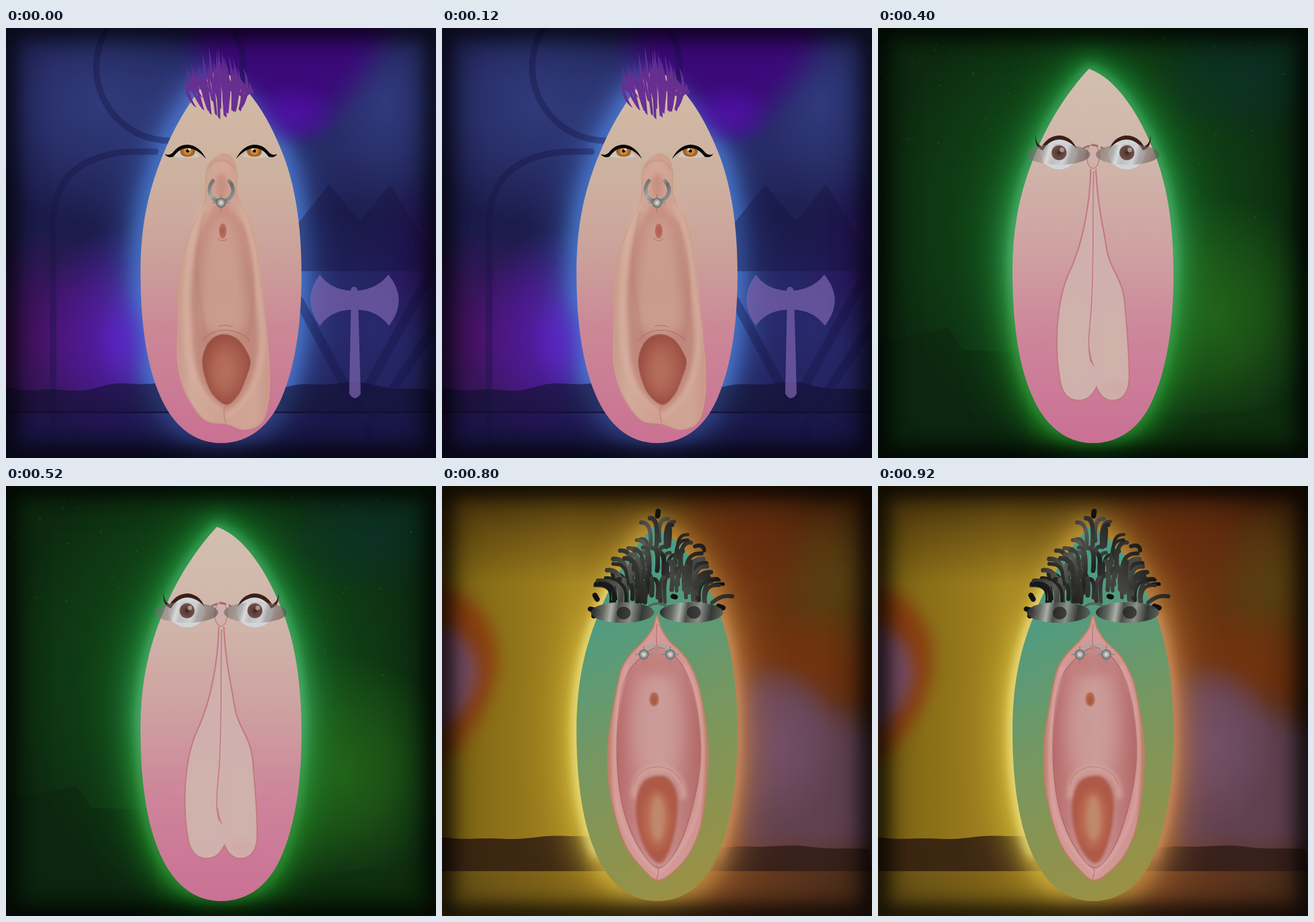
An HTML page for the animation above (1000 ms loop, 748 by 748 pixels).

```html
<!DOCTYPE html>
<html lang="en">
<head>
<meta charset="utf-8">
<title>Portrait loop</title>
<style>
html, body { margin: 0; width: 100%; height: 100%; overflow: hidden; background: #000; }
svg { display: block; width: 100vw; height: 100vh; }
</style>
</head>
<body>
<svg id="stage" viewBox="0 0 748 748" xmlns="http://www.w3.org/2000/svg"></svg>
<script>
const STEP = 200;
let defs = '', ids = 0, seed = 7;

const rnd = () => (seed = (seed * 16807) % 2147483647) / 2147483647;
const span = (a, b) => a + (b - a) * rnd();
const mix = (a, b, t) => a + (b - a) * t;
const r1 = v => Math.round(v * 10) / 10;

// Gradients: stops are "offset color [opacity]"
function grad(type, attrs, stops) {
  const id = 'g' + ids++;
  const body = stops.map(s => {
    const [o, c, a = 1] = s.split(' ');
    return `<stop offset="${o}" stop-color="${c}" stop-opacity="${a}"/>`;
  }).join('');
  defs += `<${type}Gradient id="${id}" ${attrs}>${body}</${type}Gradient>`;
  return `url(#${id})`;
}
const line = (x1, y1, x2, y2, ...stops) =>
  grad('linear', `gradientUnits="userSpaceOnUse" x1="${x1}" y1="${y1}" x2="${x2}" y2="${y2}"`, stops);
const radial = (...stops) => grad('radial', '', stops);

for (const b of [1, 2, 4, 8, 14, 24, 40])
  defs += `<filter id="b${b}" filterUnits="userSpaceOnUse" x="-120" y="-120" width="988" height="988" color-interpolation-filters="sRGB"><feGaussianBlur stdDeviation="${b}"/></filter>`;
const soft = b => `filter="url(#b${b})"`;

const path = (d, fill, more = '') => `<path d="${d}" fill="${fill}" ${more}/>`;
const stroke = (d, color, w, more = '') =>
  `<path d="${d}" fill="none" stroke="${color}" stroke-width="${w}" stroke-linecap="round" ${more}/>`;
const oval = (x, y, rx, ry, fill, more = '') =>
  `<ellipse cx="${x}" cy="${y}" rx="${rx}" ry="${ry}" fill="${fill}" ${more}/>`;
const box = (x, y, w, h, fill, more = '') =>
  `<rect x="${x}" y="${y}" width="${w}" height="${h}" fill="${fill}" ${more}/>`;
const group = (s, attrs) => `<g ${attrs}>${s}</g>`;
const pair = s => s + group(s, 'transform="translate(748)scale(-1 1)"');
const blob = (x, y, rx, ry, c, o = 1) =>
  oval(x, y, rx, ry, radial(`0 ${c} ${o}`, `.45 ${c} ${o * .65}`, `1 ${c} 0`));
const cloud = (d, c, o, b = 24) => path(d, c, `opacity="${o}" ${soft(b)}`);

// Smooth closed curve through "x,y x,y ..." points
function curve(text) {
  const p = text.split(' ').map(s => s.split(',').map(Number));
  const at = i => p[(i + p.length) % p.length];
  let d = 'M' + p[0];
  for (let i = 0; i < p.length; i++) {
    const [a, b, c, e] = [at(i - 1), at(i), at(i + 1), at(i + 2)];
    d += `C${[0, 1].map(k => r1(b[k] + (c[k] - a[k]) / 6))} ${[0, 1].map(k => r1(c[k] - (e[k] - b[k]) / 6))} ${c}`;
  }
  return d + 'Z';
}

const BODY = 'M367 71C335 105 300 155 275 216C247 282 234 345 234 425C234 520 246 590 268 640C290 690 325 722 374 722C425 722 460 690 480 642C502 590 514 520 514 430C514 350 505 280 482 220C455 150 415 88 367 71Z';

function glow(fill, wide, bright = 1) {
  const layer = (w, o, b) => path(BODY, fill, `stroke="${fill}" stroke-width="${w}" opacity="${bright * o}" ${soft(b)}`);
  return layer(wide * 1.5, .4, 40) + layer(wide, .5, 24) + layer(wide * .6, .75, 14);
}
function vignette(o) {
  const edge = (w, b, k) => box(0, 0, 748, 748, 'none', `stroke="#000" stroke-width="${w}" opacity="${r1(o * k)}" ${soft(b)}`);
  return edge(34, 14, 1) + edge(60, 24, .5);
}

// Tapered lock of hair
function lock(x, y, tx, ty, w, bend, fill) {
  const dx = tx - x, dy = ty - y, len = Math.hypot(dx, dy) || 1;
  const nx = -dy / len, ny = dx / len, mx = x + dx * .5, my = y + dy * .5;
  const side = k => `${r1(mx + nx * (bend + k * w))} ${r1(my + ny * (bend + k * w))}`;
  return path(`M${r1(x)} ${r1(y)}Q${side(1)} ${r1(tx)} ${r1(ty)}Q${side(-1)} ${r1(x)} ${r1(y)}Z`, fill);
}

// Blades with blunt slanted roots and pointed, inward-curving tips
function spikyHair(fill, shaft) {
  seed = 41;
  let s = '';
  const n = 39;
  for (let i = 0; i < n; i++) {
    const j = (i * 16) % n, u = -1 + 2 * j / (n - 1), a = Math.abs(u), row = j % 3;
    const x = 374 + u * 42 + span(-3, 3), y = 160 - a * 20 - row * 19 - span(0, 8);
    const tx = 366 + u * 56 + span(-6, 6), ty = 20 + a * 52 + row * 14 + span(0, 18);
    const mx = 372 + u * 62, my = mix(y, ty, .48), w = span(1.9, 2.8), k = w + 2;
    s += path(`M${r1(x - w)} ${r1(y - 2)}L${r1(x + w)} ${r1(y + 2)}Q${r1(mx + k)} ${r1(my)} ${r1(tx)} ${r1(ty)}Q${r1(mx - k)} ${r1(my)} ${r1(x - w)} ${r1(y - 2)}Z`, i % 2 ? fill : shaft);
  }
  return s;
}

function quiffHair() {
  seed = 99;
  let s = '';
  for (let i = 0; i < 38; i++) {
    const t = i / 37, short = (i % 3) * 5;
    const rx = mix(306, 380, t) + span(-4, 10), ry = 186 - 80 * t ** 1.3 + span(-6, 14);
    const tx = mix(268, 368, t) + span(-3, 6) + short, ty = 158 - 140 * t ** .95 + span(-8, 8) + short;
    s += lock(rx, ry, tx, ty, span(8, 14), span(4, 14), '#000');
  }
  for (let i = 0; i < 30; i++) {
    const t = i / 29;
    const rx = mix(386, 458, t) + span(-8, 4), ry = mix(112, 182, t) + span(-6, 16);
    const tx = mix(414, 476, t) + span(-5, 7), ty = mix(64, 150, t) + span(-14, 8);
    s += lock(rx, ry, tx, ty, span(9, 14), -span(3, 12), '#000');
  }
  s += path('M340 100C345 40 378 0 406 3C428 8 432 40 424 70C421 44 413 22 398 27C388 40 396 66 412 104L380 96L352 130Z', '#000');
  s += stroke('M398 66C415 50 445 68 454 86M395 76C420 72 438 78 446 92', '#000', 3);
  for (let i = 0; i < 28; i++) {
    const x = span(320, 444), y = span(112 + Math.abs(x - 380) * .8, 184);
    s += lock(x, y, x + (x - 380) * .06, y - span(8, 18), 3.5, 0, '#000');
  }
  return s + [[277, 165, 25], [290, 176, 65], [283, 146, 10], [466, 160, -40], [450, 175, -70], [470, 178, 20]]
    .map(([x, y, a]) => oval(x, y, 9, 4, '#000', `transform="rotate(${a} ${x} ${y})"`)).join('');
}

// Round-ended strands that rise and arch outwards
function curlyHair() {
  seed = 1234;
  const inks = [line(280, 90, 470, 200, '0 #111', '.3 #5a5a54', '.5 #20211f', '.75 #4b4b47', '1 #0b0b0b'),
    line(460, 60, 300, 200, '0 #090909', '.5 #454642', '1 #161616')];
  let s = '';
  for (let i = 0; i < 74; i++) {
    const u = -1 + 2 * ((i * 29) % 74) / 73, a = Math.abs(u), out = Math.sign(u) * (rnd() < .82 ? 1 : -1);
    const top = 48 + a ** 1.5 * 125;
    const ty = mix(top, 172, (i % 5) / 5 + span(0, .14)), x = 376 + u * 80 + span(-5, 5);
    const y = Math.min(202, ty + span(28, 52)), tx = x + out * span(5, 14) + u * 20;
    s += stroke(`M${r1(x)} ${r1(y)}Q${r1(x - out * 4)} ${r1(ty - 2)} ${r1(tx)} ${r1(ty)}`, inks[i % 2], r1(span(5.5, 8.5)));
  }
  return s + stroke('M266 190l4 7M258 214l12 3M264 226l9-5M376 44l-1 8M402 192l4 1M481 209l8 3', '#111', 9) +
    stroke('M470 203Q486 188 505 192M440 105Q455 100 456 112', inks[1], 7);
}

// Figures
function openForm() {
  const outer = curve('374,221 393,226 401,250 402,292 423,335 436,385 443,450 451,520 457,580 457,640 445,684 415,698 383,688 346,681 314,637 299,582 300,500 303,420 321,355 346,300 350,245');
  const inner = curve('374,300 392,318 414,345 430,410 436,480 440,540 434,600 412,645 381,665 350,640 330,590 324,520 322,460 328,390 345,340');
  const mouth = curve('378,533 402,541 418,562 425,583 416,612 404,638 384,655 362,640 350,618 342,586 345,562 357,542');
  return path(outer, line(300, 0, 456, 0, '0 #c99b8d', '.15 #d2aa9b', '.5 #cfa091', '.85 #d0a596', '1 #c9988a'), 'stroke="#c9a087" stroke-width="2.5"') +
    path(inner, line(0, 300, 0, 660, '0 #c99182', '.4 #bd877c', '1 #c28a7e'), soft(4)) +
    path(curve('376,330 397,350 410,420 413,520 345,520 342,430 354,355'), '#cda093', `opacity=".8" ${soft(8)}`) +
    stroke('M341 310C322 370 310 430 314 520C313 590 335 640 374 664M409 310C429 370 438 440 446 525C449 595 426 645 386 674', '#dbb5a5', 7, `opacity=".75" ${soft(4)}`) +
    stroke('M350 550C335 450 320 430 345 320M420 545C437 460 430 390 410 340', '#b57b70', 3, `opacity=".5" ${soft(2)}`) +
    oval(375, 258, 19, 31, '#d4a798', soft(4)) + oval(375, 274, 11, 21, '#c89080', soft(4)) +
    stroke('M355 244C354 228 390 222 397 246', '#c3937f', 2, soft(1)) +
    path(mouth, radial('0 #b36d5b', '.65 #a85d4e', '1 #994f43'), 'stroke="#a9614f" stroke-width="1.5"') +
    oval(378, 598, 16, 36, '#b8705c', `opacity=".6" ${soft(8)}`) +
    stroke('M342 544C360 519 402 520 424 544M370 519Q382 515 394 520', '#ae7164', 1.2) +
    stroke('M381 657Q377 669 382 687', '#b98476', 1.5) +
    oval(377, 353, 6.5, 13, radial('0 #ac5d50', '1 #b97061')) + stroke('M368 366Q377 374 385 366', '#b77c6d', 1.2);
}

function wideForm() {
  const outer = curve('374,225 381,247 395,269 412,285 428,305 445,343 458,410 463,470 458,540 449,595 430,640 403,671 375,686 350,667 320,627 299,565 289,500 290,440 299,380 311,322 328,293 350,270 367,247');
  const inner = curve('374,281 405,296 432,340 447,410 449,485 434,565 407,635 376,664 344,631 317,568 305,490 306,405 316,340 340,304');
  const mouth = curve('374,504 395,510 409,540 407,590 393,640 376,656 354,632 340,590 338,548 350,515');
  return path(outer, line(290, 0, 462, 0, '0 #bf8173', '.08 #d19794', '.5 #d39b99', '.92 #cf9491', '1 #ba7d67'), 'stroke="#bd8062" stroke-width="2.5"') +
    path(inner, line(306, 0, 450, 0, '0 #b76c6b', '.25 #c48584', '.5 #c99391', '.75 #c08180', '1 #b26967'), 'stroke="#ad6663" stroke-width="1.5"') +
    oval(374, 420, 42, 95, '#cda09d', `opacity=".7" ${soft(14)}`) +
    path(curve('360,290 390,290 410,325 335,325'), '#bd7875', `opacity=".6" ${soft(8)}`) +
    stroke('M322 315C300 390 294 460 303 545C316 610 345 645 374 672M424 313C453 380 461 450 449 545C436 610 406 650 376 674', '#dda9a6', 5, `opacity=".7" ${soft(2)}`) +
    stroke('M335 540C330 475 417 470 420 540', '#d2a19a', 10, soft(4)) +
    stroke('M334 520C342 478 406 478 418 520', '#b77a72', 1.2) +
    path(mouth, '#ae5a49', soft(2)) + oval(374, 580, 25, 52, '#b9684f', soft(4)) +
    oval(375, 578, 13, 40, '#bf896d', soft(4)) +
    oval(369, 371, 8, 12, '#b1654d', soft(1)) + oval(369, 373, 4, 7, '#a85d43') +
    stroke('M374 240Q372 265 374 280M374 661Q379 670 373 684', '#b8706f', 1.3);
}

function closedForm(tint, edge) {
  const left = 'M370 244C369 300 358 370 334 422C309 474 307 555 316 610C320 638 334 649 352 648C368 646 374 636 380 625C378 500 378 370 378 250Z';
  const right = 'M378 250C378 300 392 345 398 386C405 422 424 434 429 475C434 530 437 570 437 605C437 638 424 648 407 648C392 647 385 636 380 625C369 560 372 400 374 250Z';
  return oval(374, 223, 11, 21, tint, `stroke="${edge}" stroke-width="2" opacity=".8"`) +
    path(left, tint) + path(right, tint) +
    oval(344, 545, 21, 75, '#d0b7a9', `opacity=".55" ${soft(8)}`) + oval(407, 555, 18, 70, '#d0b7a9', `opacity=".55" ${soft(8)}`) +
    oval(410, 628, 20, 15, edge, `opacity=".12" ${soft(8)}`) +
    stroke('M370 246C369 300 358 370 334 422C309 474 307 555 316 610C320 638 334 649 352 648C368 646 374 636 380 625C385 636 392 647 407 648C424 648 437 638 437 605C437 570 434 530 429 475C424 434 405 422 398 386C392 345 382 310 379 246', edge, 2.4) +
    stroke('M375 250C373 330 376 430 370 500C366 540 365 565 371 582M368 560Q370 578 375 587', edge, 1.8);
}

const ball = (x, y, r) => oval(x, y, r, r, radial('0 #e8e8e4', '.5 #aaa9a5', '1 #62625f'));
const spurs = (x, y, r) => stroke(`M${x - r} ${y}h${2 * r}M${x} ${y - r}v${2 * r}`, '#8b8986', 2) + ball(x, y, r * .62);

// Backdrops
function ridge(y, amp, fill, o, a = 0, b = 748) {
  let d = `M${a} 670`;
  for (let x = a; x <= b; x += 8)
    d += `L${x} ${r1(y + Math.sin(x / 53) * amp + Math.sin(x / 17) * amp * .35)}`;
  return path(d + `L${b} 670Z`, fill, `opacity="${o}"`);
}

function violetScene() {
  const skin = line(0, 71, 0, 722, '0 #d1bda8', '.3 #cdb09f', '.5 #cba19a', '.7 #cb8796', '1 #ca7193');
  const axe = 'M546 429Q563 454 599 457Q601 450 605 450Q610 450 612 457Q647 453 665 429Q701 473 666 518Q647 492 613 490L617 636Q607 652 597 636L600 490Q564 492 546 518Q513 473 546 429Z';
  return box(0, 0, 748, 748, '#1c1c4c') +
    blob(170, 130, 250, 210, '#303b7b') + blob(660, 130, 200, 210, '#303a7c') +
    blob(60, 540, 220, 190, '#4d1167', .9) + blob(190, 540, 140, 190, '#5c1cb8', .8) +
    blob(640, 520, 210, 220, '#2b2c76', .8) + blob(740, 400, 120, 160, '#2c105b', .7) +
    glow(line(234, 0, 514, 0, '0 #4a80d8', '.5 #567adb', '1 #4a80d8'), 40, .9) +
    cloud('M330 -40H680Q620 130 500 190Q440 130 390 100Q310 90 330 -40Z', '#3d087c', .95) +
    blob(500, 150, 80, 55, '#5512b4', .7) + blob(205, 545, 50, 85, '#5d20cc', .6) +
    ridge(624, 7, '#12102f', .6) + box(0, 670, 748, 78, '#171041', 'opacity=".5"') + box(0, 667, 748, 3, '#0e0c2b', 'opacity=".6"') +
    group(oval(285, 68, 128, 128, 'none', 'stroke="#151342" stroke-width="11"') +
      stroke('M82 748V330Q88 225 215 215H260', '#151342', 11) +
      path('M500 350L562 272L615 336L668 272L748 402V423H500Z', '#16123f') +
      stroke('M745 415L610 660L510 475M745 520L632 690V748', '#171344', 16), 'opacity=".38"') +
    path(axe, '#7a63ae', 'opacity=".72"') + vignette(.6) +
    path(BODY, skin) +
    spikyHair(line(0, 20, 0, 160, '0 #50248a .75', '.5 #682c91', '1 #70309b'), '#66308f') + openForm() +
    pair(path('M290 224Q315 193 337 224Q312 228 290 224Z', '#cfc7bd') +
      path('M303 212Q316 204 329 212Q330 224 316 224Q302 224 303 212Z', '#a5652c') +
      oval(316, 214, 10, 9, radial('0 #180c04', '.28 #2a1607', '.35 #dba24d', '1 #a0571f')) + oval(319, 211, 2, 2, '#fff') +
      path('M276 219Q283 223 290 217Q301 202 317 203Q337 205 348 228Q332 209 315 209Q302 209 291 224Q281 227 276 219Z', '#090808')) +
    stroke('M360 266C348 282 356 298 369 301M388 266C402 282 393 297 380 301', line(350, 262, 398, 300, '0 #555', '.4 #aaa', '.65 #686868', '1 #a5a5a5'), 6.5) +
    spurs(374, 304, 14);
}

function nightScene() {
  const skin = line(270, 180, 480, 690, '0 #489f88', '.35 #6c9a6f', '.7 #8e944f', '1 #a08e42');
  const dark = '#0c0d2b';
  return box(0, 0, 748, 748, '#12123a') +
    blob(190, 90, 260, 180, '#3a0c38', .9) + blob(600, 500, 170, 130, '#1a246a') +
    blob(40, 620, 200, 160, '#1d0e5c', .9) + blob(720, 430, 110, 120, '#2c0d45', .8) +
    glow(line(234, 0, 514, 200, '0 #733346', '1 #7d414b'), 24, .75) +
    blob(225, 585, 75, 110, '#92164f', .8) + blob(530, 530, 55, 90, '#273b8a', .6) +
    group(path('M0 160L360 0H420L748 165L733 231L415 84L365 72L27 231Z', '#120a25'), 'opacity=".65"') +
    group(oval(136, 270, 46, 46, dark) + oval(96, 301, 20, 16, dark) +
      path('M105 326H160Q186 333 204 386L236 409V530L216 535V588H94L109 430L76 530Q65 552 49 536L78 352Q85 330 105 326Z', dark) +
      box(118, 588, 38, 160, dark) + box(160, 588, 35, 160, dark) +
      oval(622, 349, 46, 46, dark) + oval(575, 372, 19, 20, dark) + oval(670, 372, 19, 20, dark) +
      path('M580 403H664Q680 406 688 432L714 547Q705 571 691 556L665 470L687 618H556L578 470L551 555Q540 571 529 555L555 432Q562 406 580 403Z', dark) +
      box(584, 618, 33, 130, dark) + box(627, 618, 33, 130, dark) + box(350, 700, 24, 48, dark) + box(382, 700, 42, 48, dark), 'opacity=".75"') +
    path('M207 487C184 470 175 459 178 447C183 435 200 435 207 449C215 435 231 436 235 448C235 464 222 475 207 487Z', '#4a315b', 'opacity=".75"') +
    vignette(.7) + path(BODY, skin) + spikyHair('#7b2fa0', '#6d3098') + wideForm() +
    pair(path('M290 188L293 205L289 201Z', '#0b0b0b') +
      path('M259 183Q293 208 369 209L367 250Q358 261 339 257Q280 246 259 183Z', line(262, 185, 368, 240, '0 #b83c33', '.35 #c9574c', '.65 #d1a49b', '.8 #ddd0c8', '.9 #cc8177', '1 #c55147'), 'opacity=".94"') +
      path('M281 213Q305 202 334 221Q342 236 328 242Q307 239 281 213Z', '#e0a69c', 'opacity=".42"') +
      oval(316, 232, 10, 7, '#cb7264', 'opacity=".45"') +
      stroke('M352 290Q355 280 368 282', '#151313', 6) + oval(353, 296, 9, 9, '#242323') + ball(353, 296, 8)) +
    stroke('M368 223Q374 219 381 223', '#bd4a3f', 5);
}

function greenScene() {
  seed = 17;
  let stars = '';
  for (let i = 0; i < 60; i++)
    stars += oval(r1(span(15, 730)), r1(span(15, 330)), .9, .9, '#3f9545', `opacity="${r1(span(.2, .8))}"`);
  return box(0, 0, 748, 748, '#0d2a10') +
    blob(370, 330, 370, 410, '#12621c', .8) + blob(640, 80, 170, 120, '#0b322c', .7) +
    blob(590, 500, 190, 210, '#266b19', .8) + stars +
    path('M0 545Q70 535 122 520Q140 548 148 560L260 564V748H0Z', '#0b210d', 'opacity=".4"') +
    path('M374 690Q570 674 748 650V748H374Z', '#10310d', 'opacity=".55"') +
    glow(line(0, 71, 0, 722, '0 #1f9539', '.5 #34a755', '.8 #258d2b', '1 #1d8420'), 44, .95) +
    stroke(BODY, line(0, 71, 0, 722, '0 #4fb074', '.5 #67bd88', '.85 #3d9d48', '1 #2d8d35'), 10, `opacity=".8" ${soft(8)}`) +
    vignette(.65) +
    path(BODY, line(0, 71, 0, 722, '0 #d2bfae', '.25 #d0b5aa', '.48 #cea2a1', '.72 #cd859a', '1 #ca7095')) +
    closedForm('#d0b0ad', '#c27a7f') +
    pair(oval(315, 217, 32, 29, '#d2d5d8') +
      path('M274 184Q274 201 285 206Q297 186 318 187Q338 190 346 211Q332 194 315 194Q297 195 287 213Q271 208 274 184Z', '#3c1f18')) +
    [314, 434].map(x => oval(x, 220, 55, 18, line(x - 55, 205, x + 45, 235, '0 #655d5b .65', '.3 #8c8784 .5', '.38 #e0e0de .6', '.48 #9a9795 .35', '.65 #ccc .4', '.74 #857b78 .5', '1 #5f5754 .65'))).join('') +
    [315, 433].map(x => oval(x, 217, 13, 13, radial('0 #3b2420', '.4 #5d403a', '1 #74504a')) +
      oval(x + 5, 212, 4, 4, '#bba6a0', 'opacity=".8"')).join('') +
    stroke('M358 209Q374 199 391 209', '#93696a', 3, 'stroke-dasharray="9 7"');
}

function duskScene() {
  seed = 58;
  let grass = '';
  for (let i = 0; i < 260; i++) {
    const x = span(0, 748), y = span(674, 744);
    grass += stroke(`M${r1(x)} ${r1(y)}q${r1(span(4, 12))} ${r1(span(-5, 3))} ${r1(span(10, 24))} 0`, i % 2 ? '#6b6522' : '#191405', r1(span(1, 3.5)), 'opacity=".5"');
  }
  const lens = 'M259 187H347Q365 190 365 210V233Q363 253 342 253H259Z';
  return box(0, 0, 748, 748, line(0, 0, 748, 0, '0 #2a120c', '.1 #33191a', '.2 #3b2a42', '.45 #40354a', '.65 #49400f', '1 #2f260a')) +
    cloud('M200 0H330V150L240 300L180 430Q120 250 200 0Z', '#485f76', .7, 40) +
    blob(460, 60, 120, 120, '#3e2941', .9) + blob(580, 80, 130, 100, '#471d0c', .75) +
    blob(30, 360, 90, 330, '#3a180d', .7) + blob(620, 290, 180, 180, '#655b16', .75) +
    box(0, 628, 748, 120, '#171306', 'opacity=".4"') +
    blob(374, 710, 400, 60, '#56501a', .8) + group(grass, soft(1)) +
    glow(line(234, 330, 514, 470, '0 #7a98ba', '.4 #8f9ea0', '.55 #869a45', '1 #7f9330'), 38, .8) +
    cloud('M80 620L235 530V600L140 640Z', '#4a2417', .7, 14) +
    cloud('M275 200Q215 320 222 480L245 470V300Z', '#a9c3dc', .8, 14) +
    blob(525, 370, 65, 115, '#a5bc48', .8) + blob(240, 610, 50, 70, '#6c8626', .6) +
    vignette(.7) +
    path(BODY, line(0, 71, 0, 722, '0 #d4c2b2', '.25 #ceb5af', '.48 #c9a2a0', '.62 #caa29f', '.8 #ceb4a5', '1 #cfc0b0')) +
    quiffHair() + closedForm('#cfaba9', '#c57579') +
    pair(path(lens, line(0, 187, 0, 253, '0 #cf963f', '.5 #d7a95f', '1 #d7a145'), 'stroke="#c98d37" stroke-width="2.5" opacity=".96"') +
      oval(314, 218, 29, 27, '#dfbd83', 'opacity=".72"') + oval(314, 217, 13, 13, radial('0 #a9652c', '.45 #ba7632', '1 #c68a43')) +
      path('M276 195Q312 184 350 205Q315 196 278 212Z', '#e1bb77', 'opacity=".5"') +
      stroke('M264 236l14 9M269 233l13 7M264 242l8 5', '#b97b2e', 1.2)) +
    stroke('M366 218H382', '#b56e2a', 5);
}

function goldScene() {
  const skin = line(250, 230, 490, 690, '0 #4c9c84', '.45 #779760', '1 #9d9042');
  const shades = x => oval(x, 220, 55, 18, line(x - 55, 210, x + 55, 228, '0 #222321', '.2 #666864', '.32 #b0b0aa', '.43 #4a4b48', '.62 #8f908b', '.8 #333432', '1 #5e605b'), 'opacity=".95"');
  return box(0, 0, 748, 748, line(0, 0, 748, 0, '0 #7a6113', '.3 #a38420', '.52 #8e6a1b', '.7 #6f3810', '1 #4a260d')) +
    box(0, 0, 748, 170, line(0, 0, 0, 170, '0 #2b1606 .7', '1 #2b1606 0')) +
    blob(520, 90, 180, 140, '#6d2e0f', .75) + blob(690, 170, 110, 150, '#5a4512', .8) +
    cloud('M-60 150Q100 190 95 310Q80 440 -60 520Z', '#8a3c10', .95, 14) +
    cloud('M-60 230Q60 240 62 330Q50 410 -60 450Z', '#78506c', .95, 14) +
    blob(640, 320, 170, 120, '#7b350f', .75) +
    cloud('M500 345Q600 300 670 385L790 430V640H500Z', '#62445b', .85) +
    blob(590, 450, 100, 140, '#7b5676', .6) +
    ridge(611, 3, '#332011', .9, 0, 374) + ridge(629, 3, '#33201a', .9, 374) +
    box(0, 670, 748, 78, line(0, 0, 748, 0, '0 #624c15', '.4 #8c6d19', '.65 #714022', '1 #452b1c'), 'opacity=".85"') +
    glow(line(234, 0, 514, 0, '0 #dcc540', '.5 #c99c38', '1 #c8804c'), 42, .85) +
    stroke('M300 165C247 260 234 345 234 425C234 520 246 590 268 640', '#f8ef98', 14, `opacity=".8" ${soft(8)}`) +
    stroke('M482 220C505 280 514 350 514 430C514 520 502 590 480 642', '#dea57c', 10, `opacity=".6" ${soft(8)}`) +
    vignette(.65) + path(BODY, skin) + curlyHair() + wideForm() +
    shades(314) + shades(434) + oval(316, 221, 12, 11, '#1d1d1c', 'opacity=".7"') + oval(438, 220, 12, 11, '#1d1d1c', 'opacity=".7"') +
    stroke('M360 209Q374 200 391 209', '#52645a', 4) +
    pair(stroke('M354 287Q358 278 369 277', '#a9a7a3', 6) + spurs(351, 293, 14)) + oval(374, 282, 5, 5, '#c18480');
}

const stage = document.getElementById('stage');
const scenes = [violetScene, nightScene, greenScene, duskScene, goldScene].map(make => make());
stage.innerHTML = `<defs>${defs}</defs>` + scenes.map(s => group(s, 'class="scene" display="none"')).join('');
const layers = [...stage.querySelectorAll('.scene')];

const start = performance.now();
let shown = -1;
function draw(now) {
  const next = Math.floor(Math.max(0, now - start) / STEP) % layers.length;
  if (next !== shown) {
    layers.forEach((el, i) => el.setAttribute('display', i === next ? 'inline' : 'none'));
    shown = next;
  }
  requestAnimationFrame(draw);
}
draw(start);
</script>
</body>
</html>
```
